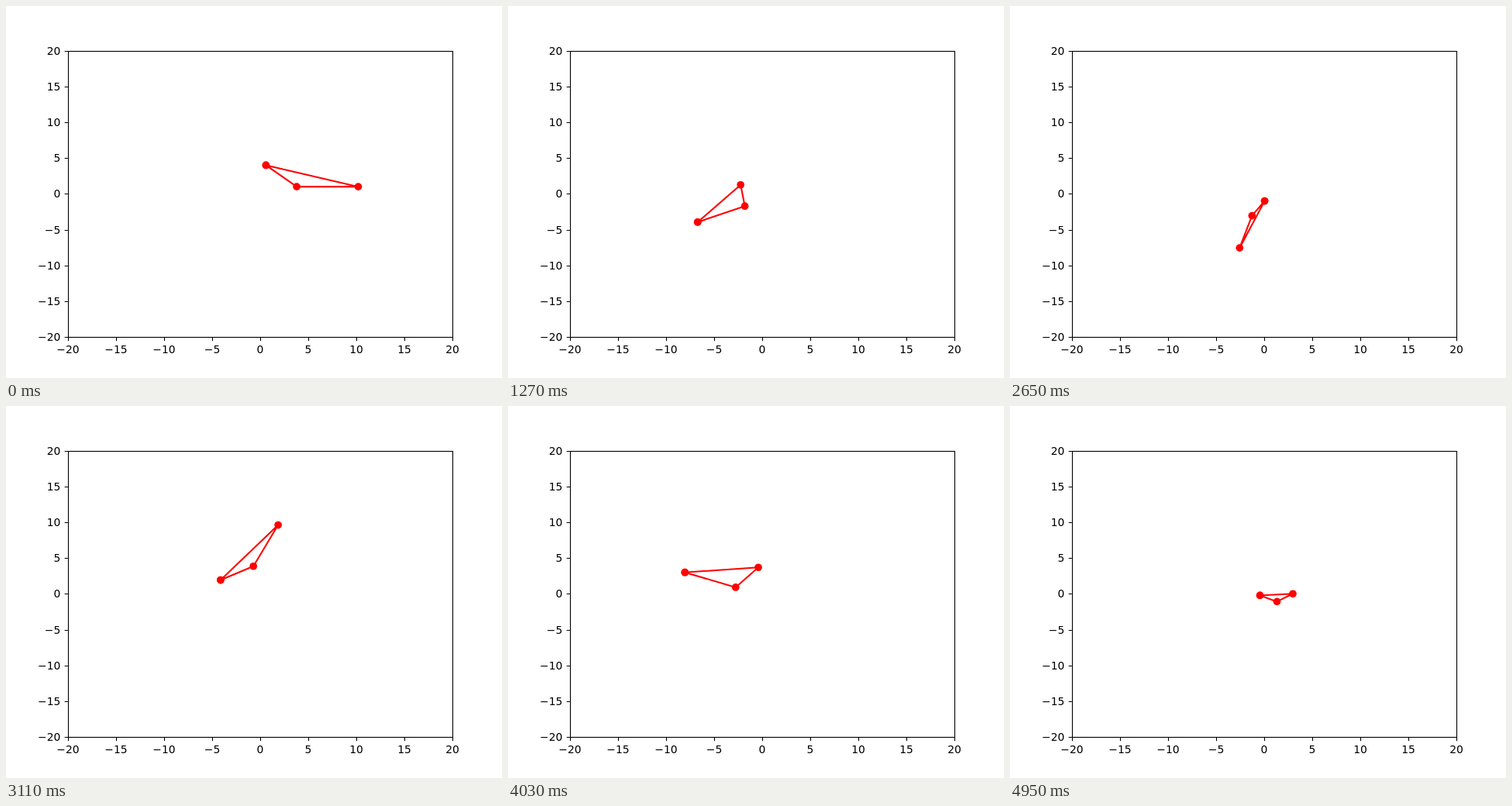
An HTML page that plays this animation: 640x480 px, repeating every 5060 ms.

```html
<!DOCTYPE html>
<html lang="en">
<head>
<meta charset="utf-8">
<title>Moving triangle</title>
<style>
  html, body { margin: 0; width: 100%; height: 100%; overflow: hidden; background: #fff; }
  svg { display: block; width: 640px; height: 480px; }
  text { font: 13.889px "DejaVu Sans", sans-serif; fill: #000; }
  .axis { fill: none; stroke: #000; stroke-width: 1.11; }
  #line { fill: none; stroke: #f00; stroke-width: 2.083; stroke-linejoin: round; stroke-linecap: square; }
  circle { fill: #f00; }
</style>
</head>
<body>
<svg viewBox="0 0 640 480">
  <rect width="640" height="480" fill="#fff"/>
  <g id="ticks"></g>
  <path id="line"/>
  <g id="dots"></g>
  <rect class="axis" x="80.5" y="58.5" width="496" height="369"/>
</svg>
<script>
const $ = id => document.getElementById(id);
const toX = x => 328 + x * 12.4;
const toY = y => 242.4 - y * 9.24;
const snap = v => Math.floor(v + 0.5) + 0.5;

function add(parent, tag, attrs, text = "") {
  const el = document.createElementNS("http://www.w3.org/2000/svg", tag);
  for (const k in attrs) el.setAttribute(k, attrs[k]);
  el.textContent = text;
  return parent.appendChild(el);
}

for (let v = -20; v <= 20; v += 5) {
  const label = String(v).replace("-", "\u2212");
  add($("ticks"), "path", { class: "axis", d: `M${snap(toX(v))} 427.5v4.86M80.5 ${snap(toY(v))}h-4.86` });
  add($("ticks"), "text", { x: toX(v), y: 448, "text-anchor": "middle" }, label);
  add($("ticks"), "text", { x: 70.3, y: Math.round(toY(v) + 5), "text-anchor": "end" }, label);
}

const base = [[-1, 4], [1, 1], [5, 1]];
const dots = [...base, base[0]].map(() => add($("dots"), "circle", { r: 4.86 }));

// Scaling, rotation and translation each advance by one radian at their own pace.
function corners(tick) {
  const s = Math.floor(tick / 12), r = Math.floor(tick / 4), m = Math.floor(tick / 3);
  const sx = 1 + 0.6 * Math.cos(s), sy = 1 + 0.8 * Math.sin(s);
  const c = Math.cos(r), d = Math.sin(r);
  return base.map(([x, y]) => [
    toX(c * sx * x - d * sy * y + 2.2 * Math.cos(m)),
    toY(d * sx * x + c * sy * y + 2.2 * Math.sin(m))
  ]);
}

// 132 ticks per loop, each starting on a whole hundredth of a second.
const LOOP = 5060;
const tickAt = ms => Math.ceil((Math.floor(ms / 10) + 0.5) * 6 / 23) - 1;

let shown = -1;
function draw(ms) {
  const tick = tickAt(ms % LOOP);
  if (tick === shown) return;
  shown = tick;
  const pts = corners(tick);
  pts.push(pts[0]);
  $("line").setAttribute("d", "M" + pts.map(p => p.join(" ")).join("L"));
  dots.forEach((dot, i) => {
    dot.setAttribute("cx", pts[i][0]);
    dot.setAttribute("cy", pts[i][1]);
  });
}

let start;
function loop(now) {
  start ??= now;
  draw(Math.max(0, now - start));
  requestAnimationFrame(loop);
}
draw(0);
requestAnimationFrame(loop);
</script>
</body>
</html>
```
